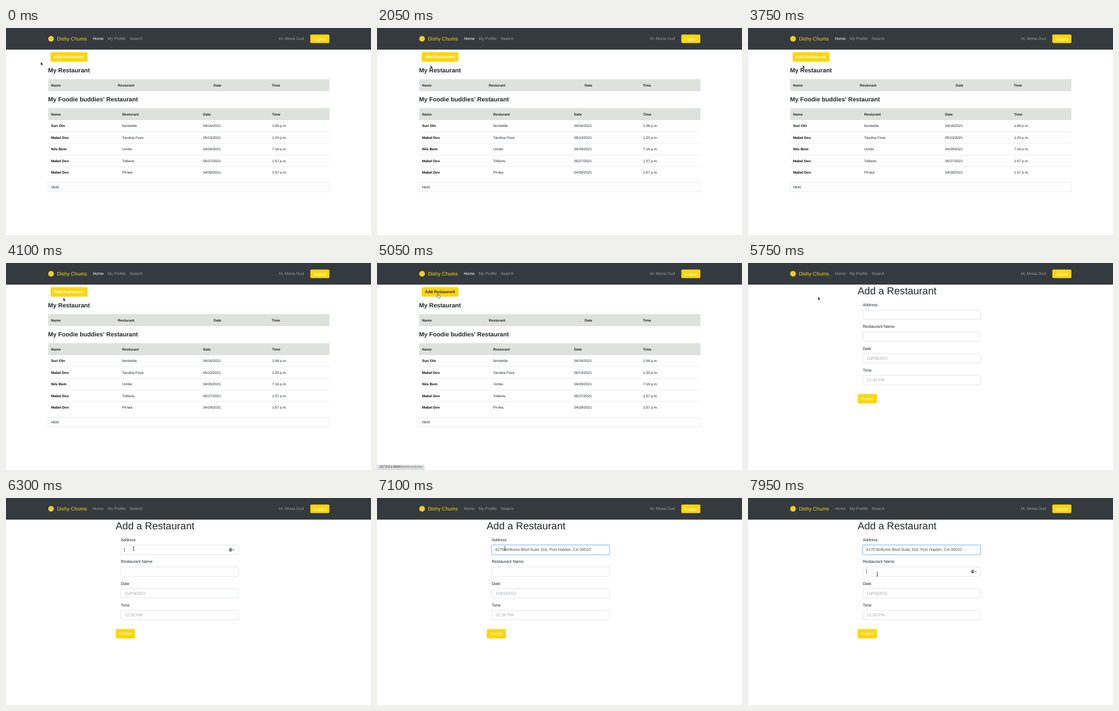
Recreate the animation shown at these times as an HTML page. Size 640 px wide and 364 px high, loop 8000 ms.

```html
<!DOCTYPE html>
<html lang="en">
<head>
<meta charset="utf-8">
<title>Add a restaurant</title>
<style>
  html, body { margin: 0; width: 100%; height: 100%; overflow: hidden; background: #fff; }
  svg { display: block; width: 100%; height: 100%; }
  text { font-family: "Liberation Sans", Arial, sans-serif; text-rendering: geometricPrecision; white-space: pre; }
</style>
</head>
<body>
<svg id="stage" viewBox="0 0 640 364">
  <g id="nav"></g>
  <g id="dashboard"></g>
  <g id="form"></g>
  <g id="status"></g>
  <g id="pointer">
    <path id="arrow" d="M0 0V5.9L1.4 4.7L2.4 7L3.4 6.6L2.4 4.4H4.2Z" fill="#111" stroke="#fff" stroke-width=".4"/>
    <path id="hand" d="M-.9 .2Q-.9-.6-.2-.6Q.5-.6 .5 .2V2.2Q1.2 1.8 1.6 2.4Q2.3 2.1 2.7 2.8Q3.6 2.6 3.7 3.5Q3.8 5.4 2.8 7H-.3Q-1.2 5.5-2.5 4Q-2.5 2.9-.9 3.8Z"
      fill="#fff" stroke="#222" stroke-width=".65"/>
    <path id="beam" d="M-1.3-3.5Q0-3.5 0-2.8Q0-3.5 1.3-3.5M0-2.8V2.8M-1.3 3.5Q0 3.5 0 2.8Q0 3.5 1.3 3.5M-.7 1.2H.7"
      fill="none" stroke="#222" stroke-width=".75"/>
  </g>
</svg>
<script>
const LOOP = 8000, STEP = 50;
const BODY = 7.11, SMALL = 6.22;
const INK = '#212529', GOLD = '#ffd60a', MUTED = '#9a9da0', RULE = '#dee2e6';
const FIELD_TOP = 83, FIELD_GAP = 38.2, FIELD_HEIGHT = 16.4;
const $ = id => document.getElementById(id);

function add(parent, tag, attrs, content) {
  const node = document.createElementNS('http://www.w3.org/2000/svg', tag);
  for (const key in attrs) node.setAttribute(key, attrs[key]);
  if (content) node.textContent = content;
  return parent.appendChild(node);
}
const rect = (parent, x, y, width, height, fill, more) =>
  add(parent, 'rect', { x, y, width, height, fill, ...more });
const text = (parent, x, y, content, size = BODY, fill = INK, bold = false) =>
  add(parent, 'text', { x, y, 'font-size': size, fill, 'font-weight': bold ? 700 : 400 }, content);
const show = (node, visible) => node.setAttribute('visibility', visible ? 'inherit' : 'hidden');

function button(parent, x, y, width, height, label, bold) {
  rect(parent, x, y, width, height, GOLD, { rx: 1.8 });
  return text(parent, x + 5.8, y + height / 2 + 2.5, label, BODY, '#fff', bold);
}

// Navigation bar
const nav = $('nav');
rect(nav, 0, 0, 640, 38, '#343a3e');
add(nav, 'circle', { cx: 79, cy: 19, r: 5, fill: '#f3cb2d' });
text(nav, 89.2, 22, 'Dishy Chums', 8.89, GOLD);
const home = text(nav, 152.2, 21.4, 'Home');
text(nav, 178.3, 21.4, 'My Profile', BODY, MUTED);
text(nav, 217, 21.4, 'Search', BODY, MUTED);
text(nav, 478.4, 20.8, 'Hi, Mona Oud', BODY, MUTED);
button(nav, 533.6, 11.5, 33.4, 15, 'Logout');

// Dashboard page
const dashboard = $('dashboard');
const addLabel = button(dashboard, 78.2, 42.5, 64.6, 16.8, 'Add Restaurant', true);

function tableHead(title, top, columns) {
  text(dashboard, 73.7, top - 11.8, title, 10.67, INK, true);
  rect(dashboard, 74, top, 493, 21, '#dfe1dc');
  ['Name', 'Resturant', 'Date', 'Time'].forEach((label, i) =>
    text(dashboard, columns[i], top + 12.5, label, SMALL, INK, true));
}
const columns = [79, 203.8, 345.5, 466.5];
tableHead('My Restaurant', 90, [79, 196, 364, 466]);
tableHead("My Foodie buddies' Restaurant", 141, columns);
[
  ['Suri Oln', 'fernkettle', '04/16/2021', '1:06 p.m.'],
  ['Mabel Dov', 'Tavolna Fiore', '05/13/2021', '1:20 p.m.'],
  ['Nils Bom', 'Umbix', '04/29/2021', '7:16 p.m.'],
  ['Mabel Dov', 'Tolbens', '05/27/2021', '1:57 p.m.'],
  ['Mabel Dov', 'Pirnea', '04/29/2021', '1:57 p.m.']
].forEach((row, r) => {
  const y = 174.1 + r * 20.5;
  if (r) rect(dashboard, 74, y - 12.5, 493, .6, RULE);
  row.forEach((cell, c) => text(dashboard, columns[c], y, cell, SMALL, c ? INK : '#000', !c));
});
rect(dashboard, 73.8, 271.3, 493, 16.6, '#fff', { stroke: RULE, 'stroke-width': .7 });
text(dashboard, 79, 281.8, 'next');

// Form page
const form = $('form');
text(form, 192.2, 55.2, 'Add a Restaurant', 17.78);
const fields = ['Address', 'Restaurant Name', 'Date', 'Time'].map((label, i) => {
  const top = FIELD_TOP + i * FIELD_GAP;
  text(form, 201.2, top - 6.9, label);
  const glow = rect(form, 200.6, top - .7, 207.4, FIELD_HEIGHT + 1.4, 'none',
    { rx: 2.4, stroke: '#80bdff', 'stroke-opacity': .55, 'stroke-width': 1.5 });
  const box = rect(form, 201.3, top, 206, FIELD_HEIGHT, '#fff',
    { rx: 1.8, stroke: '#ced4da', 'stroke-width': .6 });
  return { top, glow, box };
});

function segmented(index, parts) {
  const node = text(form, 208, fields[index].top + 10.8, '', BODY, '#a9a9a9');
  parts.forEach((part, i) =>
    add(node, 'tspan', i % 2 ? { fill: '#495057', dx: .4 } : { dx: i ? .4 : 0 }, part));
}
segmented(2, ['11', '/', '05', '/', '2021']);
segmented(3, ['12', ':', '30 PM']);
const address = text(form, 207, fields[0].top + 10.3,
  '4270 Brillome Blvd Suite 316, Port Halden, CA 00010', BODY, '#495057');
button(form, 192.5, 230.5, 33.6, 16.4, 'Submit');

const caret = rect(form, 207.2, 0, .6, 8, '#333');
const autofill = add(form, 'g', {});
add(autofill, 'circle', { cx: 393.8, cy: 0, r: 2.6, fill: '#fff', stroke: '#222', 'stroke-width': .7 });
add(autofill, 'circle', { cx: 393.8, cy: -.6, r: 1.1, fill: '#222' });
add(autofill, 'path', { d: 'M391.9 1.7Q393.8 0 395.7 1.7Q393.8 3.2 391.9 1.7Z', fill: '#222' });
add(autofill, 'path', { d: 'M397.8-.6L399.2.7L400.6-.6', fill: 'none', stroke: '#222', 'stroke-width': .8 });

// Link preview in the corner
const status = $('status');
rect(status, -2, 354.8, 85.5, 12, '#dcdee0', { rx: 1.8 });
const link = text(status, 4.2, 360.4, '', 5.5);
add(link, 'tspan', {}, '127.0.0.1:8000');
add(link, 'tspan', { fill: '#777b80' }, '/dashboard/new');

// Pointer moves: start, end, from x, from y, to x, to y
const moves = [
  [0, 200, 61, 59.6, 91, 67],
  [300, 550, 91, 67, 93.9, 65.4],
  [3700, 3750, 93.9, 65.4, 95.9, 65],
  [3850, 4400, 95.9, 65, 106.4, 55.8],
  [4500, 4550, 106.4, 55.8, 107, 54.7],
  [5600, 6250, 107, 54.7, 223.8, 89],
  [7200, 7900, 223.8, 89, 226.8, 134]
];
const progress = (t, start, end) => Math.min(1, Math.max(0, (t - start) / (end - start)));
const smooth = p => p * p * (3 - 2 * p);

function pointerAt(t) {
  const [start, end, x0, y0, x1, y1] = moves.findLast(move => t >= move[0]);
  const p = smooth(progress(t, start, end));
  return [x0 + (x1 - x0) * p, y0 + (y1 - y0) * p];
}

function render(time) {
  const t = Math.floor(time % LOOP / STEP) * STEP;
  const onForm = t >= 5150;
  const [x, y] = pointerAt(t);
  const overButton = !onForm && x > 78 && y < 59.3 && t > 3850;
  const overField = onForm && x > 201 && fields.some(f => y > f.top && y < f.top + FIELD_HEIGHT);

  show(dashboard, !onForm);
  show(form, onForm);
  home.setAttribute('fill', onForm ? MUTED : '#fff');
  addLabel.setAttribute('fill', overButton ? INK : '#fff');

  $('pointer').setAttribute('transform', `translate(${x} ${y})`);
  show($('arrow'), !overButton && !overField);
  show($('hand'), overButton);
  show($('beam'), overField);
  status.setAttribute('opacity', progress(t, 4150, 4300) * (1 - progress(t, 5350, 5500)));

  const typed = t >= 7000, onName = t >= 7950;
  const active = fields[onName ? 1 : 0];
  const glow = progress(t, 6350, 6450);
  fields.forEach((field, i) => field.glow.setAttribute('opacity', i ? 0 : glow));
  fields[0].box.setAttribute('stroke', glow > .5 ? '#80bdff' : '#ced4da');
  show(address, typed);
  show(autofill, onForm && t >= 6300 && (!typed || onName));
  autofill.setAttribute('transform', `translate(0 ${active.top + 8})`);
  show(caret, onForm && (onName || t >= 6300 && t < 6850));
  caret.setAttribute('y', active.top + 4);
}

const began = performance.now();
function tick() {
  render(performance.now() - began);
  requestAnimationFrame(tick);
}
tick();
</script>
</body>
</html>
```
